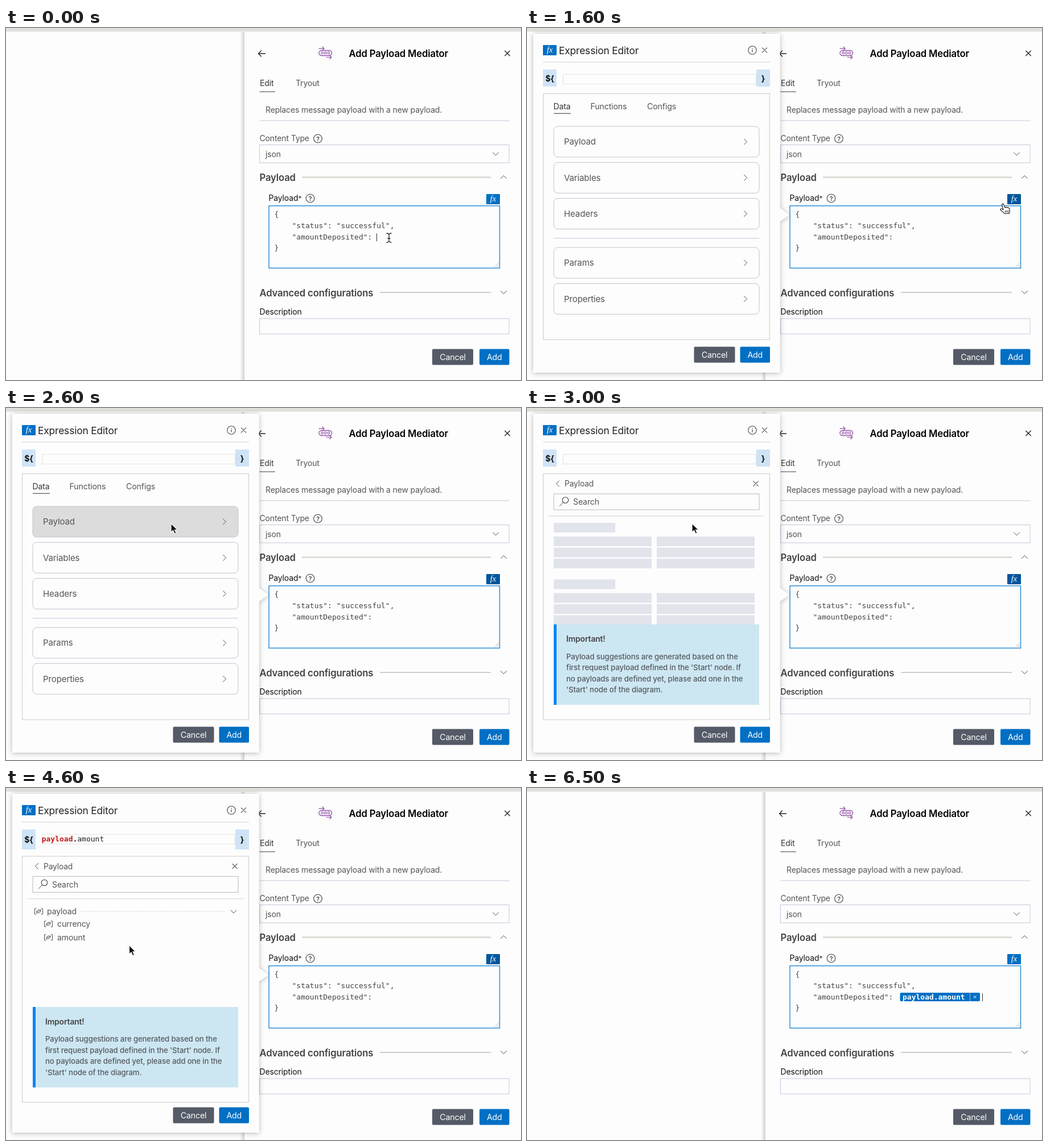
An HTML page that plays this animation: 905 by 619 pixels, repeating every 6600 ms.

```html
<!DOCTYPE html>
<html lang="en">
<head>
<meta charset="utf-8">
<title>Payload expression editor</title>
<style>
  html, body { margin: 0; width: 100%; height: 100%; overflow: hidden; background: #fdfdfd; }
  svg { display: block; width: 905px; height: 619px; }
  text { font-family: Inter, "Open Sans", sans-serif; letter-spacing: -.01em; white-space: pre; }
  .mono { font-family: "DejaVu Sans Mono", monospace; letter-spacing: 0; }
  .fx { font-family: "Liberation Serif", "Noto Serif", serif; letter-spacing: 0; }
  .line { fill: none; stroke-linecap: round; stroke-linejoin: round; }
</style>
</head>
<body>
<svg id="stage" viewBox="0 0 905 619" xmlns="http://www.w3.org/2000/svg"></svg>
<script>
const LOOP = 6600, STEP = 100;
const BLUE = '#006fc4', DARK_BLUE = '#00569b', GREY = '#555', INK = '#434343', RULE = '#c6c6dc';

const text = (x, y, s, size = 14, fill = GREY, extra = '') =>
  `<text x="${x}" y="${y}" font-size="${size}" fill="${fill}" ${extra}>${s}</text>`;
const mono = (x, y, s, fill = INK, extra = '') => text(x, y, s, 13, fill, `class="mono" ${extra}`);
const rect = (x, y, w, h, fill, extra = '') =>
  `<rect x="${x}" y="${y}" width="${w}" height="${h}" fill="${fill}" ${extra}/>`;
const frame = (x, y, w, h, stroke, extra = '') => rect(x, y, w, h, 'none', `stroke="${stroke}" ${extra}`);
const path = (d, stroke = '#505050', width = 1, extra = '') =>
  `<path class="line" d="${d}" stroke="${stroke}" stroke-width="${width}" ${extra}/>`;
const group = (id, body, extra = '') => `<g id="${id}" ${extra}>${body}</g>`;

const BOLD = 'font-weight="600"', MIDDLE = 'text-anchor="middle"';
const right = (x, y) => path(`M${x - 2.5} ${y - 5}l5 5l-5 5`);
const left = (x, y) => path(`M${x + 2.5} ${y - 5}l-5 5l5 5`);
const down = (x, y) => path(`M${x - 5} ${y - 2.5}l5 5l5 -5`);
const up = (x, y) => path(`M${x - 5} ${y + 2.5}l5 -5l5 5`);
const cross = (x, y, r = 4.2, c = '#505050', w = 1.1) =>
  path(`M${x - r} ${y - r}L${x + r} ${y + r}M${x + r} ${y - r}L${x - r} ${y + r}`, c, w);

const help = (x, y) =>
  `<circle cx="${x}" cy="${y}" r="7.3" fill="none" stroke="#444" stroke-width="1.1"/>` +
  text(x, y + 4, '?', 11, '#333', `${MIDDLE} font-weight="500"`);
const fxBadge = (x, y, id) =>
  rect(x, y, 24, 18, BLUE, `id="${id}" rx="1"`) +
  text(x + 12, y + 13, 'fx', 14.5, '#fff', `class="fx" font-style="italic" ${MIDDLE}`);
const button = (x, y, w, label, fill, id) =>
  rect(x, y, w, 28, fill, `id="${id}" rx="2"`) +
  text(x + w / 2, y + 19.5, label, 14.2, '#fff', MIDDLE);
const buttons = (x, y, addOffset, id) =>
  button(x, y, 72, 'Cancel', '#545a66', id + 'Cancel') + button(x + addOffset, y, 52.5, 'Add', BLUE, id + 'Add');

const mediatorIcon =
  frame(550, 39.5, 22.5, 9, '#9353a8', 'rx="4.5" stroke-width="1.4"') +
  [555.5, 561.3, 567].map(x => `<circle cx="${x}" cy="44" r="1.9" fill="none" stroke="#9353a8" stroke-width="1.1"/>`).join('') +
  path('M550 36.2h9M556 33l3.2 3.2l-3.2 3.2M563 51.5h9M568.8 48.5l3.2 3l-3.2 3', '#9353a8', 1.2);

const canvas =
  `<defs>
    <pattern id="dots" width="13.5" height="13.5" patternUnits="userSpaceOnUse"><rect x="1" y="5" width="1" height="1" fill="#eeeef6"/></pattern>
    <linearGradient id="edge"><stop offset="0" stop-color="#000" stop-opacity="0"/><stop offset="1" stop-color="#000" stop-opacity=".17"/></linearGradient>
    <filter id="shadow" x="-10%" y="-10%" width="120%" height="120%"><feDropShadow dx="0" dy="1" stdDeviation="5" flood-color="#000" flood-opacity=".28"/></filter>
  </defs>` +
  rect(0, 0, 905, 619, '#fdfdfd') + rect(0, 0, 419, 619, 'url(#dots)') +
  rect(0, 0, 905, 6, '#e0e0dd') + rect(0, 6, 905, 1, '#f2f2f0');

const sidePanel =
  rect(411, 7, 8, 612, 'url(#edge)') + rect(419, 7, 486, 612, '#fdfdfd') +
  path('M455.5 45H443.5M448.5 40l-5 5l5 5', '#222', 1.3) + mediatorIcon +
  text(602.5, 51, 'Add Payload Mediator', 16.7, '#000', BOLD) + cross(881, 44.5, 4.3, '#222', 1.3) +
  text(446, 102, 'Edit', 14, '#333') + text(509, 102, 'Tryout') + rect(445.5, 111.5, 27.5, 1.2, '#5a5a66') +
  text(456, 149, 'Replaces message payload with a new payload.') + rect(445.5, 162.5, 439, 1, RULE) +
  text(445.5, 199, 'Content Type') + help(548, 194.5) +
  frame(445.5, 205.5, 438.5, 31.5, RULE) + text(456, 226.5, 'json') + down(860.5, 221.5) +
  text(445.5, 269, 'Payload', 16.7, INK, BOLD) + rect(520, 261.5, 332, 2, '#cfcfc6') + up(874.5, 262) +
  text(461.5, 304, 'Payload', 14, '#111') + text(513.5, 304, '*', 12, '#333') + help(534.5, 299.5) +
  fxBadge(844, 292, 'mainFx') +
  frame(462, 312.7, 405.5, 109.5, '#1580d0', 'stroke-width="1.3"') +
  path('M859 420L866 413M863 420L866 417', '#aaa', .8) +
  mono(471.5, 332, '{') + mono(502.5, 352, '"status": "successful",') +
  mono(502.5, 371.5, '"amountDeposited":') + mono(471.5, 391, '}') +
  group('chip', rect(655.5, 360, 140.5, 15, BLUE, 'rx="2"') +
    mono(660, 371.5, 'payload.amount', '#fff', 'font-weight="700"') +
    rect(778, 360, 1, 15, '#8fc0e6') + cross(787, 367.5, 2.2, '#fff', 1)) +
  rect(651, 361, 1, 14, '#333', 'id="caret"') +
  text(445.5, 471.5, 'Advanced configurations', 16.7, INK, BOLD) + rect(657, 464, 195, 2, '#cfcfc6') + down(874.5, 465) +
  text(445.5, 503.5, 'Description', 14, '#111') + frame(445.5, 511, 438.5, 27, RULE) +
  buttons(749, 564.5, 83, 'main');

const categoryRow = (label, y) =>
  frame(47, y, 361, 54, '#c2c2d2', `rx="7" ${label === 'Payload' ? 'id="firstRow"' : ''}`) +
  text(65, y + 32.3, label, 15.1) + right(384, y + 27);
const categories =
  text(46.5, 143, 'Data', 14, '#333') + text(111.5, 143, 'Functions', 14.2) + text(211, 143, 'Configs', 14.2) +
  rect(47, 149.7, 30, 1.2, '#555') + rect(47, 369.2, 361, 1, RULE) +
  [['Payload', 173], ['Variables', 236.3], ['Headers', 299.6], ['Params', 386], ['Properties', 449.3]]
    .map(row => categoryRow(...row)).join('');

const skeletonBlock = y => rect(47, y, 108, 17, '#e1e4eb') +
  [24, 43.5, 63].map(dy => rect(47, y + dy, 172, 17, '#e1e4eb') + rect(228, y + dy, 172, 17, '#e1e4eb')).join('');
const treeIcon = (x, y) =>
  path(`M${x + 3} ${y - 5}h-2.5v10h2.5M${x + 12} ${y - 5}h2.5v10h-2.5M${x + 4} ${y}l2.5 -2.5h4.5v2.5l-2.5 2.5h-4.5zM${x + 4} ${y}h4.5l2.5 -2.5`);
const tree =
  rect(66, 225.5, 341, 17, '#dddddd', 'id="rowHover"') +
  treeIcon(50, 212.5) + text(72, 217.7, 'payload', 14.1) +
  path('M133 212.5H385', '#cfcfcf', 1, 'stroke-dasharray="1 2"') + down(400, 213) +
  treeIcon(67, 234.5) + text(90, 239.7, 'currency', 14.1) +
  treeIcon(67, 258.3) + text(90, 263.5, 'amount', 14.1);
const note = [
  'Payload suggestions are generated based on the',
  "first request payload defined in the 'Start' node. If",
  'no payloads are defined yet, please add one in the',
  "'Start' node of the diagram."
];
const detail =
  left(54, 133) + text(66, 138, 'Payload', 13.8) + cross(402, 133) +
  frame(47, 151, 361, 28, '#b9b9c4') +
  `<circle cx="67.5" cy="162" r="5.3" fill="none" stroke="#444" stroke-width="1.1"/>` +
  path('M63.5 166L57.5 172.5') + text(81, 170, 'Search', 14.1) + rect(38, 189.7, 379, 1, '#d2d2dc') +
  group('skeleton', skeletonBlock(202) + skeletonBlock(301.5)) + group('tree', tree) +
  rect(47, 380.5, 361, 141.5, '#cde7f2') + rect(47, 380.5, 5, 141.5, '#0a84f5') +
  text(69, 411, 'Important!', 13.9, INK, BOLD) +
  note.map((line, i) => text(69, 441.7 + i * 19.5, line, 13.2, '#555b60', 'font-weight="500"')).join('');

const popup =
  `<g filter="url(#shadow)"><path d="M11 10H444.5V317L461 328.5L444.5 340V606H11Z" fill="#fdfdfd"/></g>` +
  fxBadge(28, 30, 'popupFx') + text(56, 46, 'Expression Editor', 17.4, '#222') +
  `<circle cx="396" cy="39" r="7.2" fill="none" stroke="#444" stroke-width="1.1"/>` +
  rect(395.4, 38, 1.2, 4.5, '#444') + rect(395.4, 35.3, 1.2, 1.4, '#444') + cross(417.5, 39) +
  rect(28, 59.5, 399, 1, '#d2d2cc') +
  rect(28, 73, 24, 30, '#cfe3f6', 'class="brace"') + rect(403, 73, 24, 30, '#cfe3f6', 'class="brace"') +
  group('braceText', text(40, 94, '\${', 14, '#111', `font-weight="700" ${MIDDLE}`) +
    text(415, 94, '}', 14, '#111', `font-weight="700" ${MIDDLE}`)) +
  frame(63.5, 81.5, 339, 17, '#e3e3de') +
  group('expression', mono(62.7, 94, '<tspan fill="#c01a1a">payload</tspan>.', '#222', 'font-weight="700"') +
    mono(125.3, 94, 'amount', '#222')) +
  group('body', frame(28.5, 115.5, 398, 432.5, '#cbcbc6') + group('categories', categories) + group('detail', detail)) +
  group('popupButtons', buttons(293.5, 560.5, 81, 'popup'));

const ibeam = path('M-4 -8q3 0 4 2q1 -2 4 -2M0 -6V6M-4 8q3 0 4 -2q1 2 4 2M-2 1h4', '#222', 1.3);
const arrow = `<path d="M0 0V15.5L3.6 12.2L6.2 18L9 16.7L6.5 11.2H11.2Z" fill="#111" stroke="#fff" stroke-width="1.1"/>`;
const hand = `<path d="M-1.5 1.5Q-.5 -1 1.5 1L4 7Q5.5 5.5 6.8 6.8Q8.3 5.8 9.4 7.3Q11.3 6.8 11.8 9Q12.8 13 11.3 17.5H3Q.5 14 -4 11Q-4.5 8.5 -2 9L1 10.5Z" fill="#fff" stroke="#222" stroke-width="1.2" stroke-linejoin="round"/>` +
  path('M4.5 12v3.5M7 12v3.5M9.4 12v3.5', '#222');

const stage = document.getElementById('stage');
stage.innerHTML = canvas + sidePanel + group('popup', popup) +
  group('pointer', group('ibeam', ibeam) + group('arrow', arrow) + group('hand', hand));

const parts = {};
stage.querySelectorAll('[id]').forEach(el => { parts[el.id] = el; });
const braces = stage.querySelectorAll('.brace');
const show = (id, on) => parts[id].setAttribute('display', on ? 'inline' : 'none');
const fill = (id, color) => parts[id].setAttribute('fill', color);
const shift = (id, x, y) => parts[id].setAttribute('transform', `translate(${x} ${y})`);

// Pointer stops: time, x, y
const route = [
  [0, 673, 369], [300, 673, 369], [800, 853, 304], [1200, 853, 304], [1600, 836, 309],
  [2200, 290, 203], [3300, 290, 203], [3900, 247, 246], [4200, 205, 259], [4500, 205, 259],
  [5200, 412, 578.5], [LOOP, 412, 578.5]
];

function pointerAt(t) {
  const i = route.findIndex((stop, n) => n > 0 && t <= stop[0]);
  const [t0, x0, y0] = route[i - 1], [t1, x1, y1] = route[i];
  const p = (t - t0) / (t1 - t0), k = p * p * (3 - 2 * p);
  return [x0 + (x1 - x0) * k, y0 + (y1 - y0) * k];
}

function pointerKind(t) {
  if (t < 700) return 'ibeam';
  if (t < 1700 || (t >= 5200 && t < 5500)) return 'hand';
  return 'arrow';
}

function draw(t) {
  const [x, y] = pointerAt(t);
  const open = t >= 1100 && t < 5500;
  const inDetail = t >= 2700, loaded = t >= 3400, chosen = t >= 4400, done = t >= 5500;

  show('popup', open);
  show('categories', !inDetail);
  show('detail', inDetail);
  show('skeleton', !loaded);
  show('tree', loaded);
  show('expression', chosen);
  shift('body', 0, chosen ? 4.5 : 0);
  shift('popupButtons', 0, chosen ? 1 : 0);
  shift('braceText', 0, chosen ? 2 : 0);
  braces.forEach(el => el.setAttribute('height', chosen ? 35 : 30));

  const overRow = x > 47 && x < 408;
  fill('firstRow', overRow && y > 173 && y < 227 ? '#dcdcdd' : 'none');
  show('rowHover', overRow && y > 226 && y < 272);
  parts.rowHover.setAttribute('y', y < 249 ? 225.5 : 249.5);
  fill('popupAdd', t >= 5200 ? DARK_BLUE : BLUE);
  fill('mainFx', t >= 800 && !done ? DARK_BLUE : BLUE);

  show('chip', done);
  show('caret', !open && t % 1000 < 600);
  parts.caret.setAttribute('x', done ? 800 : 651);

  const kind = pointerKind(t);
  show('pointer', t < 5800);
  ['ibeam', 'arrow', 'hand'].forEach(id => show(id, id === kind));
  shift('pointer', x, y);
}

const start = performance.now();
function tick() {
  const t = (performance.now() - start) % LOOP;
  draw(Math.floor(t / STEP) * STEP);
  requestAnimationFrame(tick);
}
draw(0);
requestAnimationFrame(tick);
</script>
</body>
</html>
```
